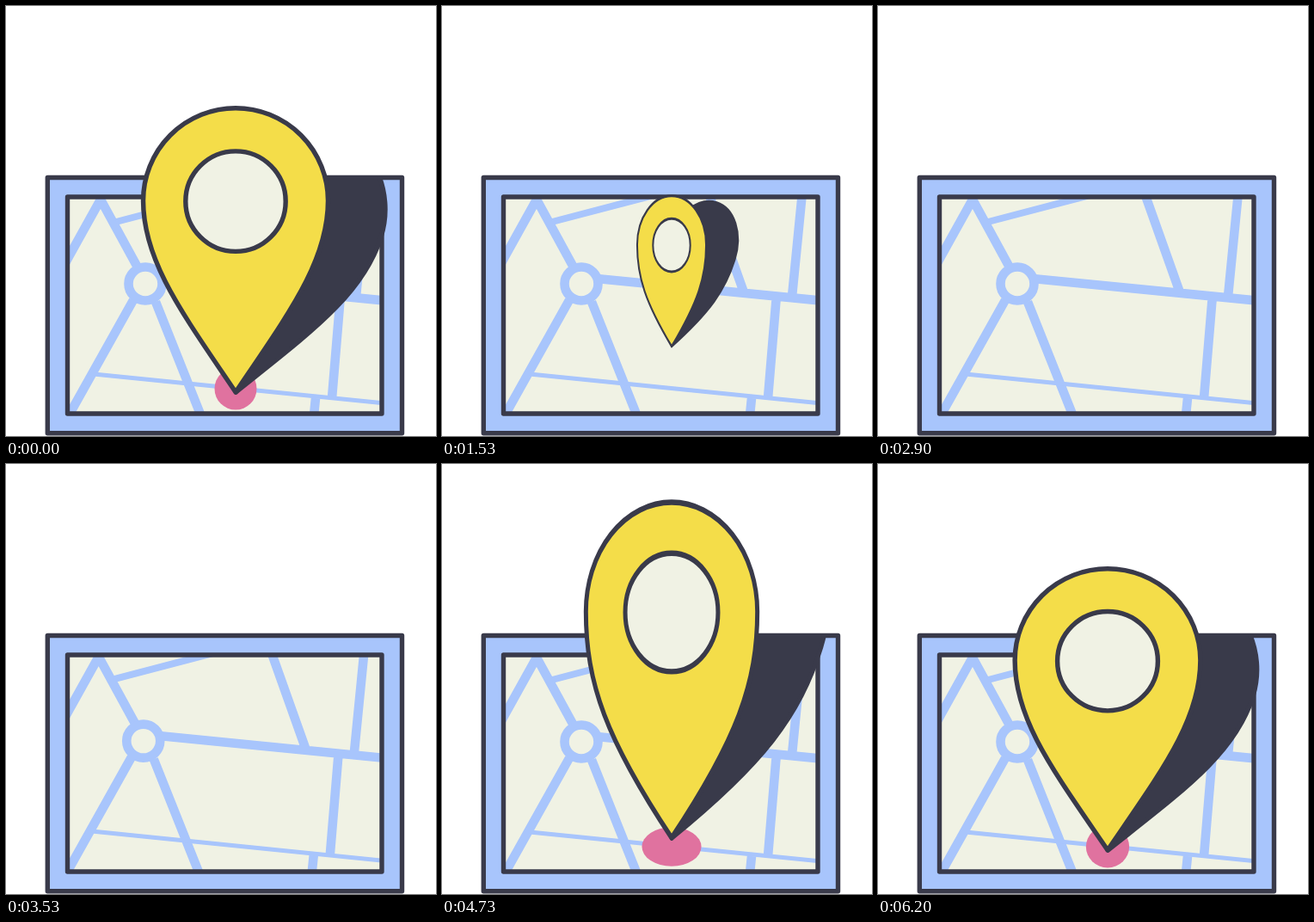
Write an HTML page that moves like this. It is 500 px wide and 500 px high and loops after 6230 ms.

```html
<!DOCTYPE html>
<html lang="en">
<head>
<meta charset="utf-8">
<title>Map pin</title>
<style>
  html, body { margin: 0; width: 100%; height: 100%; overflow: hidden; background: #fff; }
  svg { display: block; width: 100%; height: 100%; }
  .line { stroke: #393a4a; stroke-width: 5.4; stroke-linejoin: round; }
  .road { fill: none; stroke: #a8c5fc; stroke-width: 10.6; }
</style>
</head>
<body>
<svg viewBox="0 0 500 500">
  <defs>
    <clipPath id="window"><rect x="72" y="222" width="364" height="251"/></clipPath>
    <clipPath id="board"><rect x="46" y="197" width="417" height="303"/></clipPath>
    <path id="drop"/>
  </defs>
  <rect class="line" x="48.3" y="199.5" width="412.2" height="297.2" fill="#a8c5fc"/>
  <rect x="72" y="222" width="364" height="251" fill="#f0f2e4"/>
  <g clip-path="url(#window)">
    <g id="roads" class="road">
      <path d="M40 351L110 225L152 302M148 342L40 535M174 344L262 565
               M180 317L490 347.5M303 198L351 333M421 196L407 338
               M388.5 342L379 456M360 456L350 555"/>
      <path style="stroke-width:8" d="M128 251L300 206"/>
      <path style="stroke-width:5" d="M102 428L490 467"/>
      <circle cx="162" cy="323" r="19.5" fill="#f0f2e4"/>
    </g>
  </g>
  <rect class="line" x="71.5" y="222" width="365.5" height="252" fill="none"/>
  <ellipse id="spot" cx="267" cy="445" fill="#e0729f"/>
  <g clip-path="url(#board)"><use id="shadow" href="#drop" class="line" fill="#393a4a"/></g>
  <g id="pin" class="line">
    <use href="#drop" fill="#f4dd49"/>
    <circle cy="-222.7" r="58.2" fill="#f0f2e4"/>
  </g>
</svg>
<script>
const LOOP = 6230, FIRST_JUMP = 330, JUMP_EVERY = 2085, GROUND = 450, LIFT = 58;
const { PI, sin, cos, exp, min, max } = Math;

const ramp = (t, from, to) => min(1, max(0, (t - from) / (to - from)));
const ease = (t, from, to) => { const u = ramp(t, from, to); return u * u * (3 - 2 * u); };
// Holds at 1, then rings down around 0
const wobble = (t, from, decay) => {
  const u = max(0, t - from);
  return exp(-u / decay) * cos(2 * PI * u / 260);
};

// Crouch, stretch upwards, shrink away
const pinOut = t => ({
  tip: GROUND - LIFT * ease(t, 160, 380),
  size: 1 - ramp(t, 330, 480),
  stretch: .185 * ease(t, 120, 240) - .12 * sin(PI * ramp(t, 0, 160))
});

// Grow in the air, fall, bounce
const pinIn = t => ({
  tip: GROUND - LIFT * (1 - ramp(t, 1130, 1390) ** 2),
  size: ramp(t, 1135, 1293),
  stretch: .27 * wobble(t, 1270, 150)
});

function spotAt(t) {
  const leaving = t < 800;
  const size = leaving ? 1 - ease(t, 250, 400) : ease(t, 1340, 1430);
  const spread = leaving ? ease(t, 0, 230) : wobble(t, 1430, 100);
  return [size * (1 + .41 * spread), size * (1 - .07 * spread)];
}

function mapOffset(t) {
  const u = ramp(t, 500, 1150), away = sin(PI * u) ** 2;
  return [12 * away + 8 * sin(2 * PI * u), -34 * away];
}

// Tip near the origin; the sides fill out as the pin stretches
function dropPath(stretch) {
  const bulge = min(20, 110 * max(0, stretch)), x = 62 + bulge, y = -93 - bulge / 4;
  return `M-107.5-223.5A107.5 107.5 0 0 1 107.5-223.5C107.5-153 ${x} ${y} 0-1
          C${-x} ${y} -107.5-153-107.5-223.5Z`;
}

const [roads, spot, shadow, pin, drop] =
  ["roads", "spot", "shadow", "pin", "drop"].map(id => document.getElementById(id));

function draw(now) {
  const since = now % LOOP - FIRST_JUMP;
  const t = since < 0 ? JUMP_EVERY : since % JUMP_EVERY;

  const [x, y] = mapOffset(t);
  roads.setAttribute("transform", `translate(${x} ${y})`);

  const [rx, ry] = spotAt(t);
  spot.setAttribute("rx", 24.5 * rx);
  spot.setAttribute("ry", 24.5 * ry);

  const { tip, size, stretch } = t < 800 ? pinOut(t) : pinIn(t);
  const place = `translate(267 ${tip})`;
  const scale = `scale(${size * (1 - .4 * stretch)} ${size * (1 + stretch)})`;
  drop.setAttribute("d", dropPath(stretch));
  pin.setAttribute("transform", `${place} ${scale}`);
  shadow.setAttribute("transform", `${place} rotate(17.3) ${scale}`);
  pin.style.visibility = shadow.style.visibility = size > 0 ? "visible" : "hidden";
}

const begin = performance.now();
(function frame() {
  draw(performance.now() - begin);
  requestAnimationFrame(frame);
})();
</script>
</body>
</html>
```
